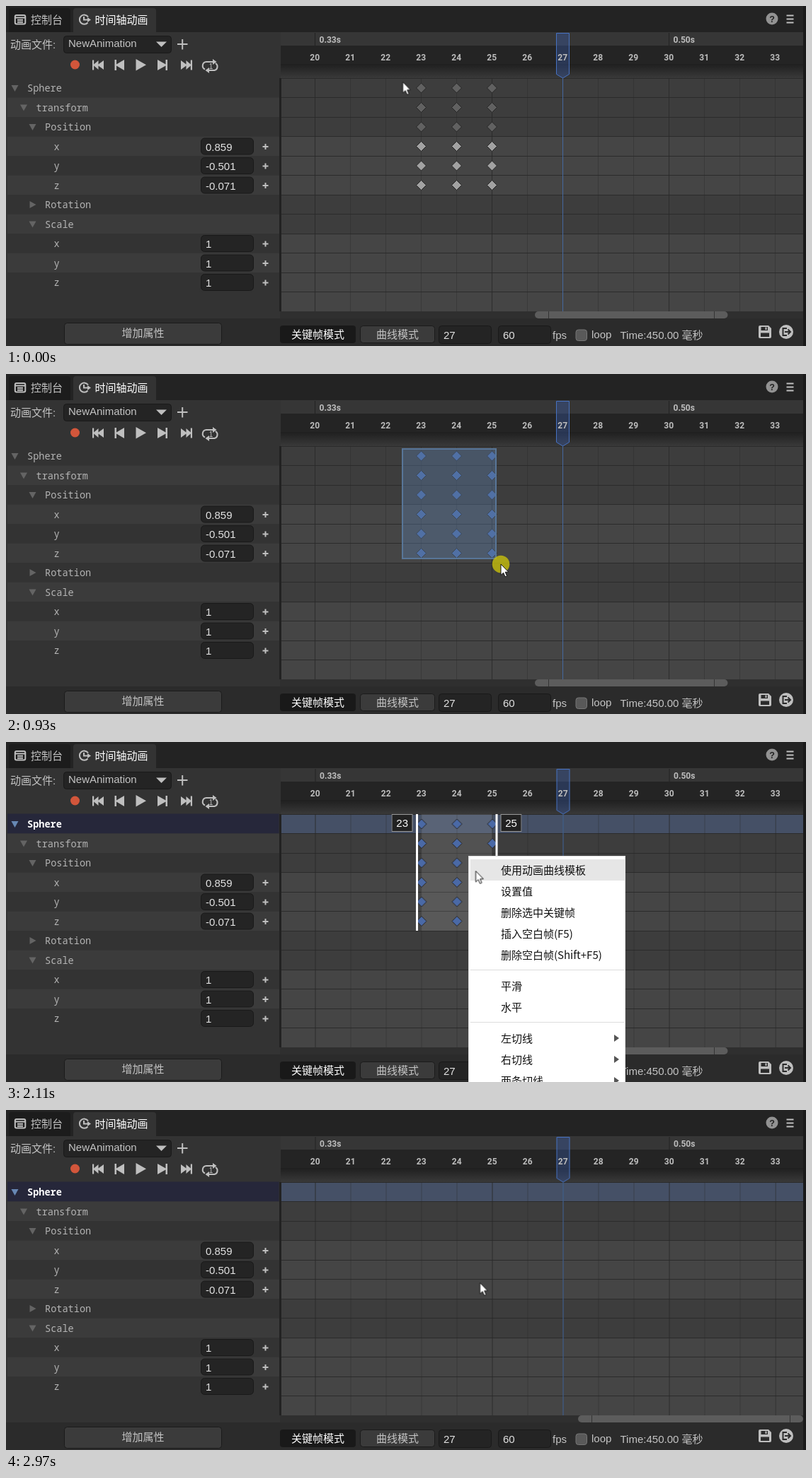
An HTML page for the animation above (3430 ms loop, 1130 by 481 pixels).

```html
<!DOCTYPE html>
<html lang="zh-CN">
<head>
<meta charset="utf-8">
<title>Timeline</title>
<style>
html, body { margin: 0; width: 100%; height: 100%; overflow: hidden; background: #1a1a1a; }
svg { display: block; width: 1130px; height: 481px; }
text { font: 15px "Liberation Sans", "Noto Sans CJK SC", sans-serif; fill: #c4c4c4; white-space: pre; }
.white { fill: #fff; }
.field text { fill: #e2e2e2; }
.mid { text-anchor: middle; }
.tree { font: 13.6px "Noto Sans Mono", monospace; fill: #b4b4b4; }
.tick { font: bold 12px Roboto, sans-serif; fill: #bdbdbd; }
.icon { fill: #bfbfbf; }
.line { fill: none; stroke: #bfbfbf; stroke-width: 2; }
.box { fill: #242424; stroke: #191919; }
.btn { fill: #3b3b3b; stroke: #1b1b1b; }
.key { stroke: #262626; fill: #a2a2a2; }
.key.dim { fill: #616161; }
#menu text { font-family: "Noto Sans CJK SC", sans-serif; fill: #111; }

.a { animation: 3430ms step-end infinite; }
#cur { animation-name: move; }
#arrow { animation-name: arrow; }
#cross { animation-name: cross; }
#press { animation-name: press; }
#sel { animation-name: sel; }
#keys { animation-name: keys; }
#range { animation-name: range; }
.picked { animation-name: picked; }
.shift { animation-name: shift; }
#menu { animation-name: menu; }
#hover { animation-name: hover; }
#bar1 { animation-name: keys; }
#bar2 { animation-name: bar2; }
.c0 { animation-name: blue0; }
.c1 { animation-name: blue1; }
.c2 { animation-name: blue2; }

@keyframes move {
  0% { transform: translate(560.5px, 107.5px); }
  2.04%, 6.12% { transform: translate(560.5px, 106.5px); }
  8.45% { transform: translate(571px, 119px); }
  10.78% { transform: translate(592px, 146px); }
  13.11% { transform: translate(622px, 182px); }
  15.45% { transform: translate(648px, 214px); }
  17.78% { transform: translate(667px, 235px); }
  20.11% { transform: translate(677.5px, 245px); }
  22.44% { transform: translate(685px, 253px); }
  24.78% { transform: translate(692px, 261px); }
  27.11% { transform: translate(699px, 269px); }
  29.15% { transform: translate(709px, 280px); }
  31.48% { transform: translate(714.5px, 286px); }
  34.4% { transform: translate(703px, 250px); }
  36.73% { transform: translate(680px, 205px); }
  38.77% { transform: translate(668px, 183px); }
  41.1% { transform: translate(658px, 168px); }
  43.44%, 50.43% { transform: translate(654.5px, 162.5px); }
  61.51% { transform: translate(663.5px, 182.5px); }
  63.55% { transform: translate(665px, 200px); }
  65.88% { transform: translate(667px, 222px); }
  68.22% { transform: translate(669px, 238px); }
  70.55%, 100% { transform: translate(669.5px, 244.5px); }
}
@keyframes arrow { 0%, 50.43% { opacity: 1; } 36.73% { opacity: 0; } }
@keyframes cross { 0%, 50.43% { opacity: 0; } 36.73% { opacity: 1; } }
@keyframes press {
  0%, 29.15%, 50.43%, 86.58% { opacity: 0; }
  6.12%, 47.81%, 84.54% { opacity: .8; }
}
@keyframes sel {
  0% { opacity: 0; }
  10.78% { opacity: 1; width: 11px; height: 13px; }
  13.11% { opacity: 1; width: 32px; height: 40px; }
  15.45% { opacity: 1; width: 62px; height: 76px; }
  17.78% { opacity: 1; width: 88px; height: 108px; }
  20.11% { opacity: 1; width: 107px; height: 129px; }
  22.44% { opacity: 1; width: 117px; height: 139px; }
  24.78% { opacity: 1; width: 125px; height: 147px; }
  27.11% { opacity: 1; width: 132px; height: 155px; }
  29.15%, 100% { opacity: 0; width: 0; height: 0; }
}
@keyframes blue0 { 13.11%, 100% { fill: #4a69a6; } }
@keyframes blue1 { 17.78%, 100% { fill: #4a69a6; } }
@keyframes blue2 { 24.78%, 100% { fill: #4a69a6; } }
@keyframes keys { 0% { opacity: 1; } 86.58%, 100% { opacity: 0; } }
@keyframes bar2 { 0% { opacity: 0; } 86.58%, 100% { opacity: 1; } }
@keyframes range { 0%, 86.58% { opacity: 0; } 29.15% { opacity: 1; } }
@keyframes picked { 0% { opacity: 0; } 29.15%, 100% { opacity: 1; } }
@keyframes shift { 0% { transform: none; } 50.43%, 100% { transform: translate(.5px, 0); } }
@keyframes menu { 0%, 86.58% { opacity: 0; } 50.43% { opacity: 1; } }
@keyframes hover {
  0% { opacity: 0; }
  61.51% { opacity: 1; transform: none; }
  63.55% { opacity: 1; transform: translate(0, 30px); }
  68.22%, 100% { opacity: 1; transform: translate(0, 60px); }
}
</style>
</head>
<body>
<svg viewBox="0 0 1130 481">
  <defs>
    <linearGradient id="fade" x2="0" y2="1">
      <stop stop-color="#1f1f1f"/><stop offset="1" stop-color="#393939"/>
    </linearGradient>
    <path id="tri" d="M-5-4H5L0 5z"/>
    <path id="plus" d="M-4-1H-1V-4H1V-1H4V1H1V4H-1V1H-4z"/>
  </defs>

  <rect width="1126" height="481" fill="#333"/>
  <rect width="1126" height="37" fill="#232323"/>
  <path d="M4 37V7q0-4 4-4H87q4 0 4 4V37z" fill="#1c1c1c"/>
  <path d="M95 37V7q0-4 4-4H208q4 0 4 4V37z" fill="#333"/>

  <!-- tabs -->
  <rect class="line" x="12.8" y="13" width="14.5" height="12.5" rx="2" stroke-width="1.6"/>
  <path class="line" d="M13 16.5H27M16 19.7H24M16 22.7H24" stroke-width="1.4"/>
  <text x="35" y="25">控制台</text>
  <path class="line" d="M115.5 23.5A6.6 6.6 0 1 1 116 15.500M110 15V19.500H118" stroke-width="1.6"/>
  <path class="icon" d="M115 16L120 19.500L115 23z"/>
  <text x="125.500" y="25" class="white">时间轴动画</text>
  <circle cx="1082" cy="18" r="8.500" fill="#929292"/>
  <text x="1082" y="22.500" class="mid" style="font-size:12.500px;font-weight:bold;fill:#232323">?</text>
  <path class="line" d="M1102.500 13.500H1112.500M1102.500 18.500H1112.500M1102.500 23.500H1112.500" stroke-width="1.6"/>

  <!-- file and transport -->
  <text x="6" y="60">动画文件:</text>
  <rect class="box" x="81.500" y="42.500" width="152" height="24" rx="4"/>
  <text x="88" y="58">NewAnimation</text>
  <path class="icon" d="M212 50.500H227L219.500 58z"/>
  <path class="line" d="M242 54H256.500M249.200 47V61.500"/>
  <circle cx="97.500" cy="83" r="6.500" fill="#d2563b"/>
  <path class="icon" d="M122 76.500H124.200V82.500L130.500 77V82.500L138 77V90L130.500 84.500V90L124.200 84.500V90.500H122z
    M153.500 76H156V82.500L167 76V91L156 84.500V91H153.500zM183.500 75L198 83.300L183.500 91.500z
    M228 76H225.500V82.500L214 76V91L225.500 84.500V91H228z
    M263 76.500H260.800V82.500L254.500 77V82.500L247 77V90L254.500 84.500V90L260.800 84.500V90.500H263z"/>
  <path class="line" d="M281 89.500A5.500 5.500 0 0 1 283 79H293M296 81A5.500 5.500 0 0 1 294.500 91H286"/>
  <path class="icon" d="M292 75L297.500 79L292 83zM287 87L281.500 91L287 95z"/>
  <text x="289.500" y="89" class="mid" style="font-size:10px">1</text>

  <g id="tree"></g>

  <!-- ruler and tracks -->
  <rect x="388" y="37" width="738" height="19" fill="#363636"/>
  <rect x="388" y="56" width="738" height="26" fill="#242424"/>
  <rect x="388" y="82" width="738" height="20" fill="url(#fade)"/>
  <g id="tracks"></g>
  <rect class="a picked" x="389" y="103" width="737" height="26" fill="#455066"/>
  <g id="grid" class="a shift"></g>
  <g class="a shift">
    <rect x="777.500" y="38.500" width="0" height="0"/>
    <path d="M777.500 38.500H795.500V96.500L786.500 102L777.500 96.500z" fill="#3a63b8" fill-opacity=".33" stroke="#4772c2"/>
    <path d="M786.500 102V432" stroke="#45689f"/>
  </g>
  <g id="ticks" class="a shift"></g>
  <g class="a shift">
    <g class="a" id="keys"></g>
    <g class="a" id="range">
      <path d="M578.500 102H581.500V267H578.500zM691 102H694V267H691z" fill="#fff"/>
      <g fill="#222" stroke="#9a9a9a">
        <rect x="544.500" y="102.500" width="29" height="24"/>
        <rect x="698.500" y="102.500" width="29" height="24"/>
      </g>
      <text x="559.200" y="120" class="mid white">23</text>
      <text x="713" y="120" class="mid white">25</text>
    </g>
  </g>
  <rect class="a" id="sel" x="560" y="106" width="0" height="0" fill="#5a7aa5" fill-opacity=".4" stroke="#587698" stroke-width="2"/>

  <!-- footer -->
  <rect y="432" x="387" width="739" height="10" fill="#2f2f2f"/>
  <rect y="442" width="1126" height="39" fill="#2b2b2b"/>
  <g class="a" id="bar1"><rect x="747" y="432" width="272.500" height="10" rx="5" fill="#5c5c5c"/><path d="M766.500 432V442M1000.500 432V442" stroke="#333"/></g>
  <g class="a" id="bar2"><rect x="808" y="432" width="318" height="10" rx="5" fill="#5c5c5c"/><path d="M827.500 432V442M1107.500 432V442" stroke="#333"/></g>
  <rect class="btn" x="82.500" y="448.500" width="222" height="30" rx="4"/>
  <text x="193.500" y="468" class="mid">增加属性</text>
  <rect x="387" y="452" width="107" height="25" rx="4" fill="#191919"/>
  <text x="440.500" y="470" class="mid white" font-weight="500" style="font-weight:500">关键帧模式</text>
  <rect class="btn" x="500.500" y="452.500" width="105" height="24" rx="4"/>
  <text x="553" y="470" class="mid">曲线模式</text>
  <g class="field">
    <rect class="box" x="611.500" y="452.500" width="74" height="25" rx="4"/><text x="618" y="471">27</text>
    <rect class="box" x="695.500" y="452.500" width="74" height="25" rx="4"/><text x="702" y="471">60</text>
  </g>
  <text x="772" y="471">fps</text>
  <rect x="805" y="458" width="15.500" height="15.500" rx="3.500" fill="#595959" stroke="#777"/>
  <text x="827" y="470">loop</text>
  <text x="867.500" y="470.500">Time:450.00 毫秒</text>
  <path class="icon" fill-rule="evenodd" d="M1065 452H1077L1081 456V468q0 2-2 2H1065q-2 0-2-2V454q0-2 2-2zM1066.500 454V459H1076V454zM1066 462.500V468H1078V462.500zM1072.500 454.500H1074.500V458H1072.500z"/>
  <circle class="icon" cx="1102" cy="461" r="10"/>
  <path d="M1103 456H1097.500V466H1103M1100 461H1107M1104.500 457.500L1108 461L1104.500 464.500" fill="none" stroke="#2b2b2b" stroke-width="2"/>

  <g class="a" id="menu">
    <rect x="653.500" y="161.500" width="221" height="330" fill="#fff" stroke="#ddd"/>
    <rect class="a" id="hover" x="656" y="166" width="218" height="30" fill="#e6e6e6"/>
    <path d="M656 322.500H873M656 396.500H873" stroke="#dcdcdc"/>
    <g id="items"></g>
  </g>

  <g class="a" id="cur">
    <circle class="a" id="press" r="12.300" fill="#c8c00c"/>
    <path class="a" id="arrow" d="M0 0V15.500L3.600 12.200L6 17.800L8.600 16.700L6.200 11.200H10.800z" fill="#fff" stroke="#111"/>
    <path class="a" id="cross" d="M0-11L4-7H1V-1H7V-4L11 0L7 4V1H1V7H4L0 11L-4 7H-1V1H-7V4L-11 0L-7-4V-1H-1V-7H-4z" fill="#fff" stroke="#333" stroke-width=".8"/>
  </g>
</svg>
<script>
const put = (id, html) => { document.getElementById(id).innerHTML = html; };
const range = (n, fn) => Array.from({ length: n }, (_, i) => fn(i)).join('');
const rowH = 27.5, top0 = 102, col = n => 436.5 + 50 * (n - 20);

const rows = [
  ['Sphere', 0], ['transform', 1], ['Position', 2],
  ['x', 3, '0.859'], ['y', 3, '-0.501'], ['z', 3, '-0.071'],
  ['Rotation', 2], ['Scale', 2], ['x', 3, 1], ['y', 3, 1], ['z', 3, 1]
];

put('tree', rows.map(([name, depth, value], i) => {
  const y = top0 + i * rowH, mid = y + 14, x = 30 + depth * 12.5;
  let s = `<rect x="2" y="${y}" width="384" height="${rowH}" fill="${i % 2 ? '#3b3b3b' : '#333'}"/>`;
  const turn = name === 'Rotation' ? 'rotate(-90)' : '';
  const label = cls => `<text class="${cls}" x="${x}" y="${mid + 5}"`;
  s += label('tree') + `>${name}</text>`;
  if (value === undefined) {
    s += `<use href="#tri" fill="#646464" transform="translate(${x - 17.5} ${mid}) ${turn}"/>`;
  } else {
    s += `<g class="field"><rect class="box" x="275.500" y="${mid - 11.5}" width="74" height="23" rx="5"/>` +
      `<text x="282" y="${mid + 6}">${value}</text></g>` +
      `<use href="#plus" class="icon" transform="translate(366.500 ${mid + .5})"/>`;
  }
  if (!i) {
    s += `<g class="a picked"><rect x="2" y="101.500" width="383.500" height="28" fill="#26273a"/>` +
      `<use href="#tri" fill="#6788b4" transform="translate(12.500 ${mid})"/>` +
      label('tree') + ` style="fill:#fff;font-weight:600">${name}</text></g>`;
  }
  return s;
}).join('') + '<rect x="386" y="102" width="3" height="330" fill="#222"/>');

put('tracks', range(12, i => {
  const y = top0 + i * rowH, leaf = (i > 2 && i < 6) || i > 7;
  return `<rect x="389" y="${y}" width="737" height="${rowH}" fill="${leaf ? '#454545' : '#3d3d3d'}"/>` +
    `<path d="M389 ${Math.floor(y) + .5}H1126" stroke="#2b2b2b"/>`;
}));

put('grid', range(14, i => {
  const x = col(20 + i), strong = i % 5 === 0;
  return `<path d="M${x} 102V432" stroke="#2a2a2a" stroke-opacity="${strong ? .85 : .4}"/>`;
}) + '<path d="M436.500 38V56M936.500 38V56" stroke="#222"/>');

put('ticks', range(14, i => `<text class="tick mid" x="${col(20 + i) - .3}" y="77">${20 + i}</text>`) +
  '<text class="tick" x="442.500" y="52">0.33s</text><text class="tick" x="942.500" y="52">0.50s</text>');

put('keys', '<rect class="a" style="animation-name:range" x="586" y="102" width="100.500" height="165" fill="#fff" fill-opacity=".11"/>' +
  range(18, i => {
    const c = i % 3, r = Math.floor(i / 3);
    return `<path class="a key c${c} ${r < 3 ? 'dim' : ''}" d="M${col(23 + c)} ${top0 + 7 + r * rowH}l7 7l-7 7l-7-7z"/>`;
  }));

const items = [
  ['使用动画曲线模板', 187], ['设置值', 217], ['删除选中关键帧', 247], ['插入空白帧(F5)', 277],
  ['删除空白帧(Shift+F5)', 307], ['平滑', 351], ['水平', 381],
  ['左切线', 425, 1], ['右切线', 455, 1], ['两条切线', 485, 1]
];
put('items', items.map(([name, y, sub]) => `<text x="699" y="${y}">${name}</text>` +
  (sub ? `<path d="M859 ${y - 11}V${y - 1}L866 ${y - 6}z" fill="#555"/>` : '')).join(''));
</script>
</body>
</html>
```
